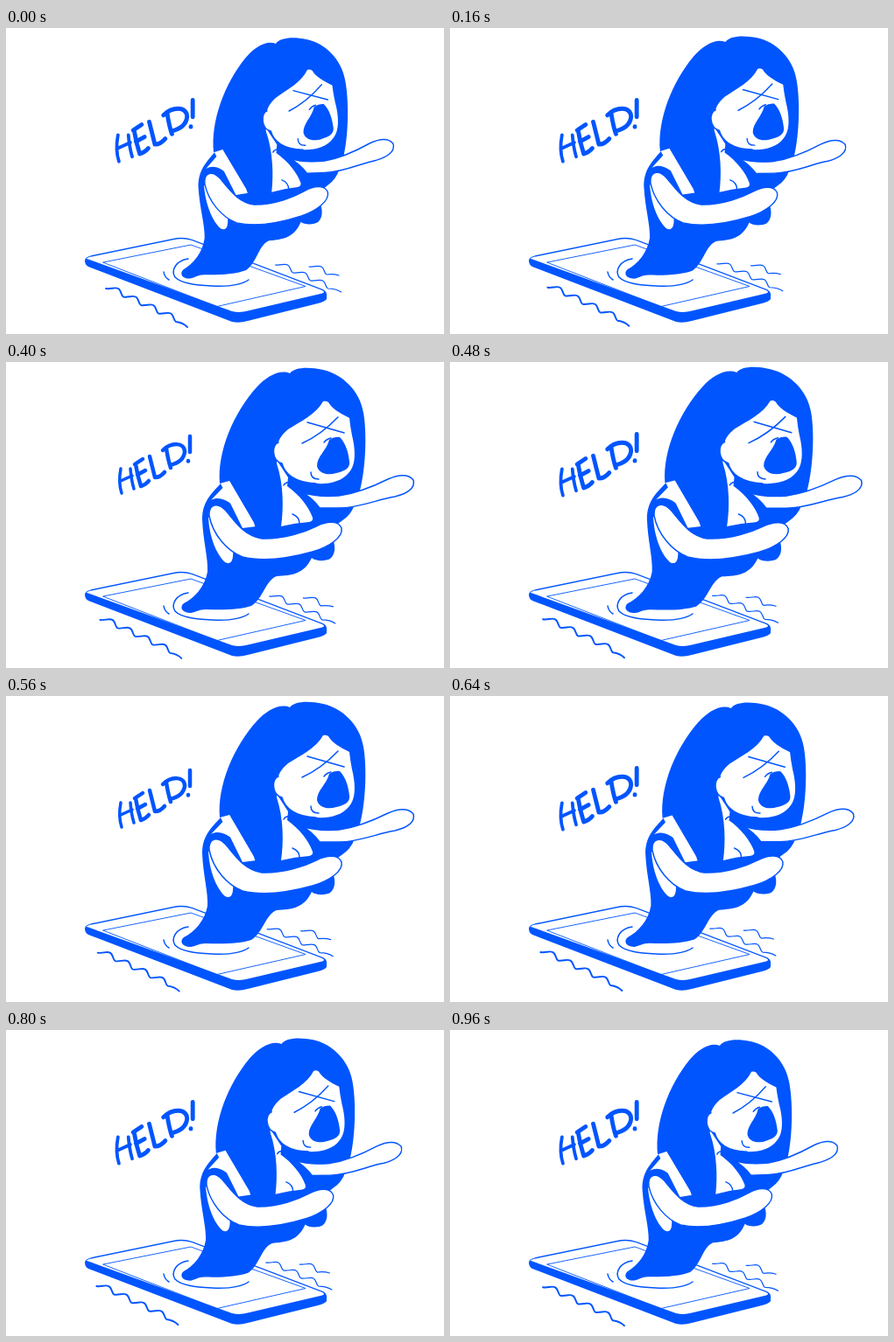
These frames come from a looping animation (500 by 350 pixels, 1040 ms). An HTML page:

```html
<!DOCTYPE html>
<html lang="en">
<head>
<meta charset="utf-8">
<title>Help!</title>
<style>
  html, body { margin: 0; height: 100%; overflow: hidden; background: #fff; }
  svg { display: block; width: 100vw; height: 100vh; }
  .ink { fill: #05f; }
  .paper { fill: #fff; }
  .line { fill: none; stroke: #05f; stroke-width: 1.5; stroke-linecap: round; stroke-linejoin: round; }
  .skin { fill: #fff; stroke: #05f; stroke-width: 1.5; stroke-linejoin: round; }
</style>
</head>
<body>
<svg viewBox="0 0 500 350">
  <g id="phone">
    <path class="ink" d="M90 266Q90 262 98 260L190 241Q202 238 213 242L362 299Q367 302 366 307V310Q364 313 356 315L276 335Q266 338 258 336L94 273Q90 271 90 266Z"/>
    <path class="paper" d="M92 264Q93 262 98 261.5L190 242.5Q202 240 212 243L361 300Q365 302 361 303.500L276 323.500Q267 326 258 324L94 264.500Z"/>
    <path class="line" style="stroke-width:.9" d="M111 268L211 248L342 295.500L241 318.500Z"/>
    <path class="line" d="M208 264C194 266 188 277 193 285C200 292 215 294 235 295C255 296 270 293 277 288M180 279Q181 285 186 288"/>
  </g>

  <g id="waves">
    <path class="line" style="stroke-width:1.9" d="M114 298c6 1 10 -2 14 0s3 8 6 9.500c6 1 10 -2 14 0s3 8 6 9.500c6 1 10 -2 14 0s3 8 6 9.500c6 1 10 -2 14 0s3 8 6 9.500q8 1 13 6"/>
    <path class="line" style="stroke-width:1.2" d="M307.500 271c6 1 10 -2 14 0s3 8 6 9c6 1 10 -2 14 0s3 8 6 9c6 1 10 -2 14 0s3 8 6 9q9 0 15 4M346 273c6 1 10 -2 14 0s3 8 6 9q8 -1 14 1"/>
  </g>

  <g id="shout" class="line" style="stroke-width:4.500" role="img" aria-label="HELP!">
    <path style="stroke-width:3.500" d="M131 122Q128 138 132 150M142 122Q143 135 146 145M131 136L144 130"/>
    <path d="M148 117Q150 130 154 142M147 117L156 111M150 129L159 124M154 142Q160 140 163 136"/>
    <path d="M164 108Q167 120 170 132Q176 132 181 126"/>
    <path d="M183 99Q185 112 188 121M179 101C188 92 204 91 204 103C203 111 196 116 187 118"/>
    <path d="M210 85V103M208 113V113.500"/>
  </g>

  <g id="woman">
    <!-- dress, hair -->
    <path class="ink" d="M245 139C234 151 224 160 224 180C225 205 231 225 230 240C227 257 215 270 203 276C198 280 200 287 211 287C217 286 220 283 228 283C250 284 268 283 280 279C294 270 296 250 309 245C326 244 340 243 349 224C353 228 365 228 370 225C376 220 376 212 374 205L350 180L270 190Z"/>
    <path class="ink" d="M324 13C312 8 297 17 286 29C260 58 241 102 244 139L255 136L283 184L290 205L351 205L383 182Q394 175 398 163L404 147C411 120 412 80 408 58C404 33 384 14 362 9C345 5 329 6 324 13Z"/>
    <path class="paper" d="M255 136L234 158C250 150 262 168 283 184Z"/>

    <!-- chest, far arm -->
    <path class="paper" d="M309 112L322 132L321 142C335 152 346 166 350 178Q351 182 346 183Q330 184 314 188C317 168 317 140 309 116Z"/>
    <path class="line" d="M327 174Q335 177 335 185M317 141Q319 137 324 138"/>
    <path class="skin" d="M338 149C352 154 366 154 380 153C402 150 420 142 436 134C450 128 460 129 465 135C468 145 456 151 444 154C424 157 404 167 380 167L358 167Q350 156 338 149Z"/>

    <!-- face -->
    <path class="paper" d="M362 45C354 60 336 68 322 77C315 83 312 88 311 92C303 94 303 113 315 116C318 128 330 138 354 139C370 140 384 136 391 127C400 118 399 100 395 84Q393 74 392 64C380 58 372 53 368 46Q365 44 362 45Z"/>
    <path class="line" d="M311 92C303 94 303 113 315 116C318 128 330 138 354 139M344 69L386 81M338 93Q360 83 379 63M348 126Q348 134 357 134M363 92Q366 88 371 87"/>
    <path class="ink" d="M369 89C366 101 355 108 355 119C357 128 368 130 377 127C387 125 393 121 392 114C391 104 388 93 381 86Q375 85 369 89Z"/>

    <!-- near arm -->
    <path class="paper" d="M231 177C232 200 240 220 250 229C257 233 260 226 259 215Z"/>
    <path class="skin" d="M232 176C231 162 242 160 251 170C262 183 272 199 292 202C318 203 342 194 354 188C368 181 380 182 383 190C385 200 370 211 350 217C325 224 295 229 270 223C252 216 236 197 232 176Z"/>
  </g>
</svg>
<script>
  const STEP = 80, STEPS = 13;
  const el = id => document.getElementById(id);
  const move = (id, value) => el(id).setAttribute("transform", value);
  const swing = (n, peak) => peak - Math.abs(n - peak);

  // Lean and stretch away from the point where the body leaves the screen.
  function lean(k) {
    const m = [1 + .0145 * k, .0056 * k, -.0052 * k, 1 + .0062 * k, 0, 0];
    return `translate(200 283) matrix(${m}) translate(-200 -283)`;
  }

  function draw() {
    const n = Math.floor(performance.now() / STEP) % STEPS;
    move("woman", lean(swing(n, 6) - 5));

    const drift = swing(n, 9);
    move("waves", `translate(${-1.33 * drift} ${-.62 * drift})`);

    // The cry flickers between two sizes on every step.
    const size = n % 2 ? 1 : 1.08;
    move("shout", `translate(170.500 117.500) scale(${size}) translate(-170.500 -117.500)`);
    requestAnimationFrame(draw);
  }
  draw();
</script>
</body>
</html>
```
